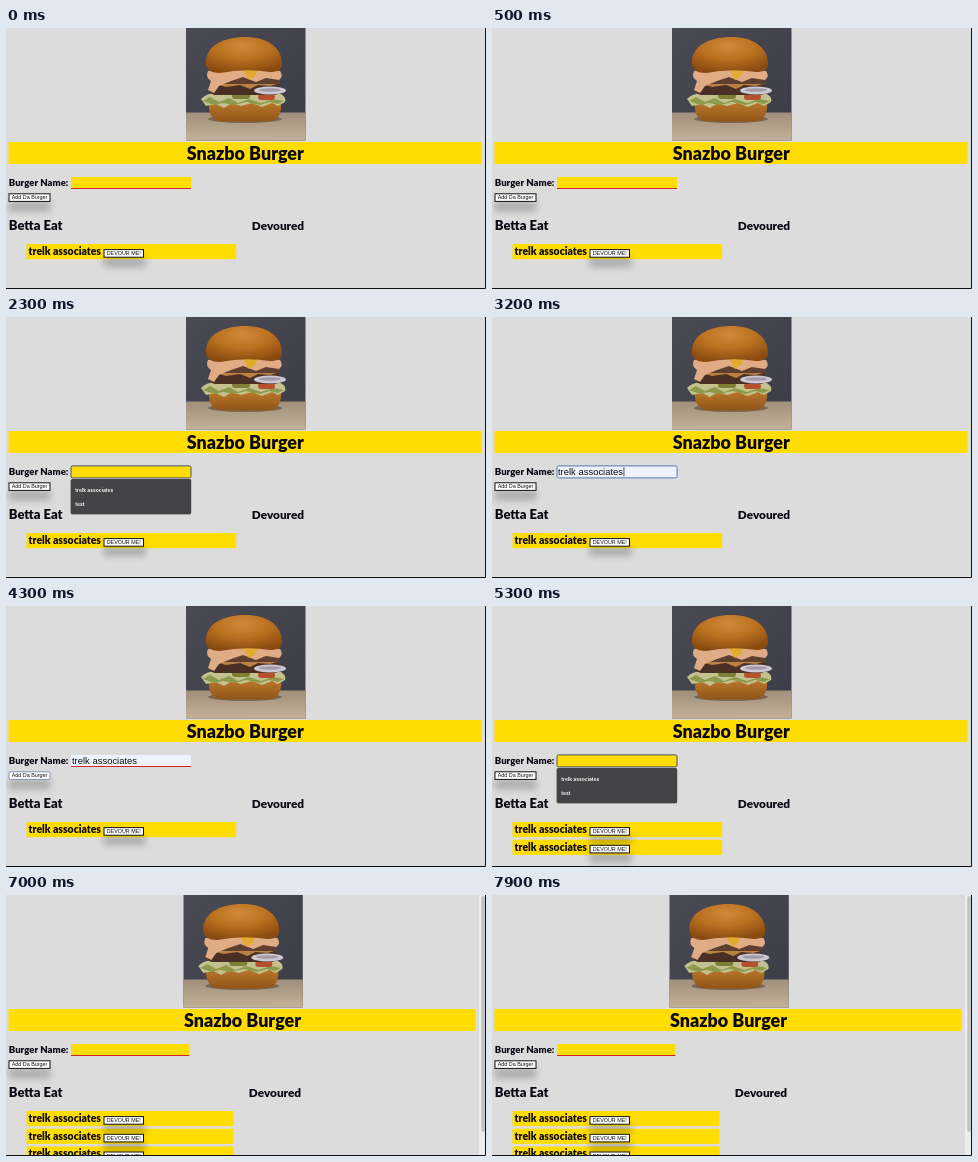
Animation, 480 px wide and 261 px high, one loop 8000 ms. Source, as an HTML page:

```html
<!DOCTYPE html>
<html lang="en">
<head>
<meta charset="utf-8">
<title>Burger list</title>
<style>
  html, body { margin: 0; width: 100%; height: 100%; overflow: hidden; background: #dcdcdc; }
  svg { display: block; width: 100vw; height: 100vh; }
  .head { font-family: Lato, sans-serif; font-weight: 900; fill: #0b0712; }
  .ui { font-family: "Liberation Sans", Arial, sans-serif; fill: #111; }
  .menu { font: 600 5px Inter, sans-serif; fill: #fff; }
</style>
</head>
<body>
<svg viewBox="0 0 480 261" preserveAspectRatio="none">
  <defs>
    <linearGradient id="wall" x1="0" y1="0" x2="1" y2="1">
      <stop offset="0" stop-color="#4a4a54"/>
      <stop offset="1" stop-color="#3c3c47"/>
    </linearGradient>
    <linearGradient id="wood" x1="0" y1="0" x2="0" y2="1">
      <stop offset="0" stop-color="#a08f7b"/>
      <stop offset="1" stop-color="#c4b198"/>
    </linearGradient>
    <radialGradient id="bun" cx=".48" cy=".25" r=".75">
      <stop offset="0" stop-color="#cf8a38"/>
      <stop offset=".5" stop-color="#b9701f"/>
      <stop offset="1" stop-color="#8a4a10"/>
    </radialGradient>
    <linearGradient id="base" x1="0" y1="0" x2="0" y2="1">
      <stop offset="0" stop-color="#bd7a2c"/>
      <stop offset="1" stop-color="#8f5417"/>
    </linearGradient>
    <filter id="soft" x="-50%" y="-200%" width="200%" height="500%">
      <feGaussianBlur stdDeviation="3.6"/>
    </filter>
    <filter id="glow" x="-5%" y="-30%" width="110%" height="160%">
      <feGaussianBlur stdDeviation=".7"/>
    </filter>
    <filter id="lens"><feGaussianBlur stdDeviation=".6"/></filter>
    <clipPath id="frame"><rect width="119.5" height="112.5"/></clipPath>
    <g id="shade">
      <rect x="0" y="8" width="42" height="10" fill="#000" opacity=".22" filter="url(#soft)"/>
    </g>
  </defs>

  <rect width="480" height="261" fill="#dcdcdc"/>

  <g id="photo" clip-path="url(#frame)">
    <rect width="120" height="113" fill="url(#wall)"/>
    <rect y="84.5" width="120" height="28.5" fill="url(#wood)"/>
    <g filter="url(#lens)">
      <ellipse cx="59" cy="91" rx="37" ry="4" fill="#5a4635" opacity=".6"/>
      <path d="M23 73H95Q97 92 82 93.5H36Q21 92 23 73Z" fill="url(#base)"/>
      <path d="M15 71Q22 64 34 66L92 65Q101 68 99 74L92 78 86 75 76 79 66 75 55 78 46 75 38 80 30 76 20 78Z" fill="#c3c28f"/>
      <path d="M17 73L24 69 33 74 43 70 52 75 63 71 75 75 87 71 98 73 92 76 83 74 74 77 60 74 48 77 37 75 28 77Z" fill="#8c9a4c"/>
      <rect x="72" y="66" width="17" height="6" rx="3" fill="#b5512f"/>
      <rect x="46" y="65" width="18" height="6" rx="3" fill="#7d7f35"/>
      <rect x="25" y="47" width="69" height="12" rx="6" fill="#5f4030"/>
      <rect x="24" y="56" width="70" height="11" rx="5" fill="#4a3024"/>
      <path d="M30 56H91L84 58 72 57 64 61 54 57 40 59Z" fill="#b98142"/>
      <ellipse cx="84" cy="62.5" rx="16" ry="4" fill="#ccc9d2"/>
      <ellipse cx="84" cy="62" rx="11" ry="1.8" fill="#a39aa8"/>
      <path d="M22 43Q60 38 94 43Q98 48 93 52L80 50 70 54 57 49 45 53 33 58 28 65 22 62 25 53Q19 49 22 43Z" fill="#dfac86"/>
      <path d="M57 42L72 41 69 48 63 52Z" fill="#e2ab2d"/>
      <path d="M20 36C19 18 37 9 59 9S96 19 96 36Q96 44 84 44Q59 40 34 45Q21 45 20 36Z" fill="url(#bun)"/>
    </g>
  </g>

  <rect id="bar" x="2.5" y="114" height="22" fill="#fd0" filter="url(#glow)"/>
  <text id="title" class="head" y="132" font-size="17.9" text-anchor="middle">Snazbo Burger</text>

  <text class="head" x="2.8" y="157.6" font-size="9.6">Burger Name:</text>
  <g id="field">
    <rect id="fill" x="65" y="149" height="12"/>
    <rect id="line" x="65" y="160" height="1" fill="#d3262b"/>
    <rect id="ring" x="65" y="148.9" height="12" rx="1.5" fill="none"/>
    <text id="value" class="ui" x="66" y="158" font-size="9.45">trelk associates</text>
    <rect id="caret" x="131.6" y="150.2" width=".7" height="9.2" fill="#111"/>
  </g>

  <g id="add" transform="translate(2.5 165.3)"></g>

  <text class="head" x="2.8" y="202.4" font-size="13">Betta Eat</text>
  <text id="done" class="head" y="202.4" font-size="11.8">Devoured</text>

  <g id="bands" fill="#fd0"></g>
  <g id="items"></g>

  <g id="menu">
    <rect x="65" y="163" width="120" height="35" rx="2" fill="#000" opacity=".25" filter="url(#glow)"/>
    <rect x="64.6" y="162" width="120.6" height="35" rx="1.5" fill="#444447"/>
    <text class="menu" x="69.3" y="174.6">trelk associates</text>
    <text class="menu" x="69.3" y="188.8">test</text>
  </g>

  <g id="scroll">
    <rect x="473.5" width="6.5" height="261" fill="#ececec"/>
    <rect x="473.5" width=".6" height="261" fill="#f8f8f8"/>
    <rect x="475.3" y="1" width="3.6" height="236" rx="1.8" fill="#c2c2c2"/>
  </g>
  <path d="M0 260.5H479.5V0" fill="none" stroke="#111"/>
</svg>
<script>
  const LOOP = 8000, PITCH = 17.7;
  const $ = id => document.getElementById(id);
  const set = (el, attrs) => {
    for (const key in attrs) el.setAttribute(key, attrs[key]);
  };
  const show = (el, on) => set(el, { visibility: on ? "visible" : "hidden" });
  const within = (t, from, to) => t >= from && t < to;

  const button = (label, width) => `
    <use href="#shade"/>
    <rect class="edge" x=".5" y=".5" width="${width}" height="7.6" fill="#fff" stroke="#111"/>
    <text class="ui" x="${width / 2 + .5}" y="6.2" font-size="5.4" text-anchor="middle">${label}</text>`;

  $("add").innerHTML = button("Add Da Burger", 41);
  const edge = $("add").querySelector(".edge");

  // Yellow bands lie below every label and button shadow.
  for (let i = 0; i < 3; i++) {
    const y = 216 + i * PITCH;
    $("bands").innerHTML += `<rect x="20.5" y="${y}" height="15.2" filter="url(#glow)"/>`;
    $("items").innerHTML += `<g>
      <text class="head" x="22.6" y="${y + 11}" font-size="10.4">trelk associates</text>
      <g transform="translate(97.5 ${y + 5.1})">${button("DEVOUR ME!", 39.5)}</g></g>`;
  }
  const bands = [...$("bands").children], items = [...$("items").children];

  // Each round: open the menu, pick a name, press the button, get a new row.
  const rounds = [
    { open: 1800, pick: 2800, press: 4000, added: 4500 },
    { open: 5000, pick: 5600, press: 6500, added: 6900 }
  ];

  function draw(t) {
    const round = rounds.find(r => within(t, r.open, r.added));
    const open = !!round && t < round.pick;
    const filled = !!round && !open;
    const pressed = !!round && t >= round.press;
    const focus = !!round && !pressed;
    const rows = 1 + rounds.filter(r => t >= r.added).length;
    const narrow = rows > 2;

    set($("photo"), { transform: `translate(${narrow ? 177.3 : 180} 0)` });
    set($("bar"), { width: narrow ? 467 : 473 });
    set($("title"), { x: narrow ? 236.5 : 239.3 });
    set($("done"), { x: narrow ? 242.8 : 245.8 });

    const width = narrow ? 118.3 : 120;
    for (const id of ["fill", "line", "ring"]) set($(id), { width });
    set($("fill"), { fill: filled ? "#eef3ff" : "#fd0" });
    set($("ring"), { stroke: open ? "#46506a" : "#5874b4" });
    show($("line"), !focus);
    show($("ring"), focus);
    show($("value"), filled);
    show($("caret"), filled && focus && (t - round.pick) % 1000 < 500);
    show($("menu"), open);
    set(edge, { stroke: pressed ? "#7f93b4" : "#111", rx: pressed ? 1 : 0 });

    bands.forEach((band, i) => {
      set(band, { width: narrow ? 207 : 209.7 });
      show(band, i < rows);
      show(items[i], i < rows);
    });
    show($("scroll"), narrow);
  }

  function tick() {
    draw(performance.now() % LOOP);
    requestAnimationFrame(tick);
  }
  tick();
</script>
</body>
</html>
```
